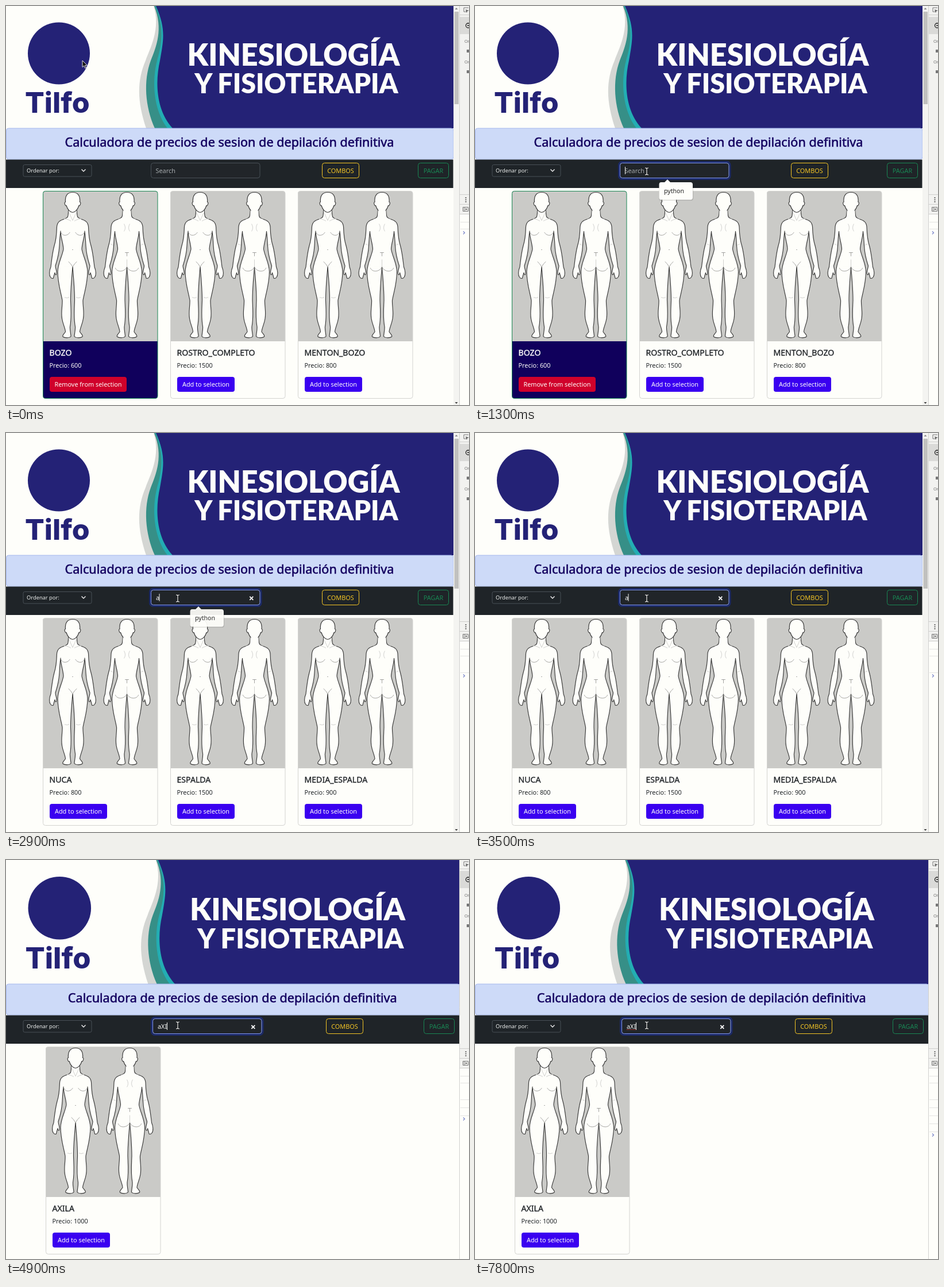
An HTML page that plays this animation: 806 px wide and 695 px high, repeating every 8 s.

```html
<!DOCTYPE html>
<html lang="es">
<head>
<meta charset="utf-8">
<title>Calculadora de precios</title>
<style>
html, body { margin: 0; width: 100%; height: 100%; overflow: hidden; background: #fefefa; }
svg { display: block; width: 806px; height: 695px; }
text { font: 10.9px "Noto Sans", "Open Sans", sans-serif; }
.big { font: 900 52px Lato, sans-serif; fill: #fefefa; }
.brand { font: 800 50px Inter, sans-serif; fill: #242276; }
.head { font-size: 21.65px; fill: #13005f; stroke: #13005f; stroke-width: .55; }
.name { font-size: 14.1px; stroke-width: .35; }
.small { font-size: 9.3px; }
.skin { fill: #fefefa; stroke: #3a3a3a; stroke-width: 1.15; stroke-linejoin: round; }
.mark { fill: none; stroke: #8d8d8b; stroke-width: .8; stroke-linecap: round; }
.faint { fill: none; stroke: #c6c6c4; stroke-width: .8; }
.line { stroke: #e4e4e2; }
</style>
</head>
<body>
<svg viewBox="0 0 806 695">
  <defs>
    <path id="half" d="M7,30 C8,44 7,46 14,48.500 C22,51 26.500,53 27.500,62 C28,78 29,86 32,95 C35.500,108 36.500,120 38,132 C40.500,138 41.500,146 38.500,150 Q36,153 33.500,151.500 C33,148 32,146 31,142 C30.500,147 27.500,147 28,141 C28,137 30,134 30,130 C26,118 23.500,105 23,95 C22.500,85 22,78 21,70 C20.500,82 16.500,90 16,101 C18,113 25.500,125 26,140 C26,160 21,174 18,190 C17.500,200 20.500,210 18.500,222 C17,232 13,238 12.500,245 C15,249 18.500,251 17,253.500 C14,256 5,256 3,253 C3,248 5,243 4.500,236 C1.500,220 3,205 3.500,190 C3.500,170 1.500,150 0,132"/>
    <g id="body">
      <use href="#half" class="skin"/>
      <use href="#half" class="skin" transform="scale(-1 1)"/>
      <path fill="#fefefa" d="M-7,30 H7 V46 L15,49 V131 H-15 V49 L-7,46Z"/>
      <path class="skin" d="M0,2 C9,2 13.500,8 12.500,19 Q15,19 13,24 Q12,26 11,25 C9,32 4,37 0,37 C-4,37 -9,32 -11,25 Q-12,26 -13,24 Q-15,19 -12.500,19 C-13.500,8 -9,2 0,2Z"/>
    </g>
    <g id="figures">
      <path fill="#cacac7" d="M0,4 Q0,0 4,0 H196 Q200,0 200,4 V261.500 H0Z"/>
      <g transform="translate(52 0)">
        <use href="#body"/>
        <path class="mark" d="M-21,69 C-20,79 -9,79 -5,72 M21,69 C20,79 9,79 5,72 M-7,123 Q-3,126 0,132 Q3,126 7,123 M-.500,102 h1"/>
        <path class="faint" d="M-6,38 L0,51 L6,38 M-15,48 Q-7,49 -3,52 M15,48 Q7,49 3,52 M-14,185 q4,2 8,0 M6,185 q4,2 8,0"/>
      </g>
      <g transform="translate(146.500 0)">
        <use href="#body"/>
        <path fill="#fefefa" d="M-6,29 H6 V40 H-6Z"/>
        <path class="mark" d="M-20,134 C-18,141 -5,142 0,132 C5,142 18,141 20,134 M-3,107 h6 M0,107 v6"/>
        <path class="faint" d="M-5,57 Q-1,64 -5,70 M5,57 Q1,64 5,70 M-29,92 l5,2 M29,92 l-5,2 M0,119 V132"/>
      </g>
    </g>
  </defs>

  <rect width="806" height="695" fill="#fefefa"/>

  <g id="banner">
    <path fill="#d4d6d3" d="M257,0 C270,40 250,75 243,95 C228,130 228,165 244,213 H300 V0Z"/>
    <path fill="#368f87" d="M258,0 C274,40 262,70 252,95 C239,130 242,175 259,213 H300 V0Z"/>
    <path fill="#23adb3" d="M260,0 C277,40 270,70 263,95 C254,130 256,180 281,213 H300 V0Z"/>
    <path fill="#242276" d="M261,0 C279,40 274,60 268,95 C260,130 260,180 290,213 H779 V0Z"/>
    <circle cx="92" cy="82.500" r="54" fill="#242276"/>
    <text class="brand" x="33" y="186">Tilfo</text>
    <text class="big" x="500.500" y="104" text-anchor="middle">KINESIOLOGÍA</text>
    <text class="big" x="505.500" y="152" text-anchor="middle" style="font-size:46.600px">Y FISIOTERAPIA</text>
  </g>

  <g id="bar">
    <rect class="wide" x=".5" y="213" width="778" height="54" rx="4" fill="#cddaf8" stroke="#a6b8ee"/>
    <rect class="wide" y="267.500" width="779" height="49.500" fill="#1f2428"/>
    <text id="title" class="head" x="389" y="245" text-anchor="middle">Calculadora de precios de sesion de depilación definitiva</text>
    <rect x="30" y="276.500" width="119" height="20.500" rx="2.500" fill="none" stroke="#495057"/>
    <text class="small" x="36" y="290" fill="#eceeed">Ordenar por:</text>
    <path d="M131.500,284.500 l3.500,3.500 l3.500,-3.500" fill="none" stroke="#eee" stroke-width="1.400"/>
    <g id="combos">
      <rect x="550.500" y="273.500" width="64" height="26" rx="4" fill="none" stroke="#f4c525"/>
      <text x="582.500" y="290.500" text-anchor="middle" fill="#f4c525">COMBOS</text>
    </g>
    <g id="pay">
      <rect x="717.500" y="273.500" width="53" height="26" rx="4" fill="none" stroke="#198754"/>
      <text x="744" y="290.500" text-anchor="middle" fill="#198754">PAGAR</text>
    </g>
    <g id="field">
      <rect x="252.500" y="273.500" width="189.500" height="26" rx="4" fill="#212529" stroke="#495057"/>
      <g id="focus" fill="none">
        <rect x="250.500" y="271.500" width="193.500" height="30" rx="5.500" stroke="#1c2a68" stroke-width="3"/>
        <rect x="252.500" y="273.500" width="189.500" height="26" rx="4" stroke="#8096ee"/>
      </g>
      <text id="hint" x="260.500" y="290.500" font-size="10.700" fill="#a6abae">Search</text>
      <g fill="#f5f6f4">
        <text id="q1" x="261" y="290.500">a</text>
        <text id="q3" x="261" y="290.500">aXI</text>
        <text id="q4" x="261" y="290.500">aXIL</text>
      </g>
      <path id="clear" d="M424.300,284.800 l6,6 m0,-6 l-6,6" stroke="#fff" stroke-width="1.800"/>
      <g id="spell"><path id="wave" d="M261,292.500 h17" stroke="#e0352f" stroke-dasharray="1.500 1"/></g>
      <g id="caretX"><rect id="caret" y="280" width="1" height="13" fill="#f5f6f4"/></g>
    </g>
  </g>

  <g id="setA"></g>
  <g id="setB"></g>
  <g id="setC"></g>

  <g id="scroll">
    <rect x="779" width="11" height="695" fill="#f4f4f1"/>
    <rect id="thumb" x="780.500" y="10" width="7.500" height="161" fill="#c1c1bf"/>
    <path d="M781.500,6 l2.500,-3 l2.500,3Z" fill="#888"/>
    <path d="M781.500,690 l2.500,3 l2.500,-3Z" fill="#444"/>
  </g>

  <g id="tools">
    <rect x="789" width="17" height="695" fill="#fefefa"/>
    <rect x="789" width="17" height="362" fill="#f2f2f0"/>
    <rect x="790" y="19" width="16" height="30" fill="#dadad8"/>
    <path d="M790,15.500 h16 M790,328.500 h16 M790,345.500 h16 M790,362.500 h16" stroke="#cfcfcd"/>
    <path d="M789.500,0 V695" stroke="#d0d0ce"/>
    <path d="M803,10 h-6 v-7 h8" fill="none" stroke="#777"/>
    <path d="M800,6 l6,2 l-3,1 l-1,3Z" fill="#666"/>
    <circle cx="804.500" cy="34" r="4" fill="none" stroke="#222" stroke-width="1.300"/>
    <path d="M803,34 h3" stroke="#222" stroke-width="1.500"/>
    <text x="798" y="64" fill="#777" style="font-size:7.5px">Or</text>
    <text x="798" y="100" fill="#777" style="font-size:7.5px">Or</text>
    <path d="M802,76 h4 v5 h-4Z M802,112 h4 v5 h-4Z" fill="#777"/>
    <path d="M799.500,333 h2 v2 h-2Z m0,3.500 h2 v2 h-2Z m0,3.500 h2 v2 h-2Z" fill="#666"/>
    <path d="M795.500,350.500 h9 v7 h-9Z M798,350.500 v7" fill="none" stroke="#777"/>
    <path d="M800,352 l3,2 l-3,2Z" fill="#666"/>
    <path class="line" d="M791,376.500 h15 M791,388.500 h15"/>
    <path id="log1" class="line" d="M791,417.500 h15"/>
    <path id="log2" class="line" d="M791,431.500 h15 M791,445.500 h15"/>
    <path id="log3" class="line" d="M791,459.500 h15"/>
    <path id="log4" class="line" d="M791,473.500 h15"/>
    <path id="prompt" d="M796,392.500 l2.500,2.500 l-2.500,2.500" fill="none" stroke="#7682c8" stroke-width="1.200"/>
  </g>

  <g id="tip">
    <rect x="320" y="307.500" width="60" height="31.500" rx="4" fill="#000" opacity=".13"/>
    <path d="M324,307 h6 l5,-5 l5,5 h35 q4,0 4,4 v22.500 q0,4 -4,4 h-51 q-3.500,0 -3.500,-4 v-22.500 q0,-4 3.500,-4Z" fill="#fefefa"/>
    <text x="329" y="326" fill="#222" style="font-size:10.6px">python</text>
  </g>

  <g id="arrowPos"><path id="arrow" d="M0,0 V11.500 L2.700,9 L4.700,13.300 L6.600,12.400 L4.700,8.300 H8.300Z" fill="#111" stroke="#f5f5f2" stroke-width=".9"/></g>
  <g id="beamPos"><g id="beam" fill="none">
    <path d="M-3,-6 Q0,-6 0,-4.500 Q0,-6 3,-6 M0,-5 V5 M-3,6 Q0,6 0,4.500 Q0,6 3,6" stroke="#15181b" stroke-width="3"/>
    <path d="M-3,-6 Q0,-6 0,-4.500 Q0,-6 3,-6 M0,-5 V5 M-3,6 Q0,6 0,4.500 Q0,6 3,6" stroke="#f4f4f2" stroke-width="1.200"/>
  </g></g>
</svg>
<script>
const LOOP = 8000, FILTER = 2900, NARROW = 4900;
const el = id => document.getElementById(id);

// Cards
function card(x, y, name, price, picked) {
  const ink = picked ? '#fefefa' : '#212529';
  const label = picked ? 'Remove from selection' : 'Add to selection';
  const width = picked ? 134 : 100;
  return `<g transform="translate(${x} ${y})">
    <rect x=".5" width="199.500" height="361" rx="4" fill="${picked ? '#10005c' : '#fefefa'}"/>
    <use href="#figures"/>
    <rect x=".5" width="199.500" height="361" rx="4" fill="none" stroke="${picked ? '#198754' : '#d3d3d0'}"/>
    <text class="name" x="11.500" y="286" fill="${ink}" stroke="${ink}">${name}</text>
    <text x="11.500" y="307.500" fill="${ink}">Precio: ${price}</text>
    <rect x="12" y="323.500" width="${width}" height="26" rx="4" fill="${picked ? '#d0022b' : '#3a00f0'}"/>
    <text x="${12 + width / 2}" y="340.500" text-anchor="middle" fill="#fefefa">${label}</text>
  </g>`;
}
el('setA').innerHTML = card(64, 322.5, 'BOZO', 600, true) +
  card(286, 322.5, 'ROSTRO_COMPLETO', 1500) + card(508, 322.5, 'MENTON_BOZO', 800);
el('setB').innerHTML = card(64, 322.5, 'NUCA', 800) +
  card(286, 322.5, 'ESPALDA', 1500) + card(508, 322.5, 'MEDIA_ESPALDA', 900);
el('setC').innerHTML = card(69, 325.5, 'AXILA', 1000);

// Stepped keyframes from a timeline of [ms, value]
const sheet = document.head.appendChild(document.createElement('style'));
let count = 0, rules = '';
function track(target, prop, steps) {
  const name = 'k' + count++;
  const frames = steps.map(([t, v]) => `${t / LOOP * 100}% { ${prop}: ${v} }`).join(' ');
  rules += `@keyframes ${name} { ${frames} }
${target} { animation: ${name} ${LOOP}ms step-end infinite }\n`;
}
const fade = (target, ...steps) => track(target, 'opacity', [[0, 0], ...steps]);
const move = (target, ...steps) => track(target, 'transform',
  steps.map(([t, x, y = 0]) => [t, `translate(${x}px, ${y}px)`]));

track('#setA', 'opacity', [[0, 1], [FILTER, 0]]);
fade('#setB', [FILTER, 1], [NARROW, 0]);
fade('#setC', [NARROW, 1]);

// Without the scrollbar the page grows from 779 to 790 px
track('#scroll', 'opacity', [[0, 1], [NARROW, 0]]);
track('#thumb', 'height', [[0, '161px'], [FILTER, '261px']]);
track('#banner', 'transform', [[0, 'scale(1)'], [NARROW, `scale(${790 / 779})`]]);
track('.wide', 'width', [[0, '778.5px'], [NARROW, '789.5px']]);
move('#bar', [0, 0], [NARROW, 0, 3]);
move('#title', [0, 0], [NARROW, 5.3]);
move('#field', [0, 0], [NARROW, 3]);
move('#combos', [0, 0], [NARROW, 7]);
move('#pay', [0, 0], [NARROW, 10]);

// Pointer
move('#arrowPos', [0, 133, 95], [300, 139, 103], [400, 160, 141], [500, 195, 207],
  [600, 229, 271], [700, 253, 306], [800, 279, 304]);
track('#arrow', 'opacity', [[0, 1], [900, 0]]);
move('#beamPos', [0, 296.5, 291], [1100, 299, 288]);
fade('#beam', [900, 1]);

// Search field
fade('#focus', [1100, .5], [1200, 1]);
fade('#tip', [1200, .5], [1300, 1], [2900, .94], [3000, .5], [3100, .06], [3500, 0]);
track('#hint', 'opacity', [[0, 1], [FILTER, 0]]);
fade('#q1', [FILTER, 1], [NARROW, 0]);
fade('#q3', [NARROW, 1], [5100, 0], [6500, 1]);
fade('#q4', [5100, 1], [6500, 0]);
fade('#clear', [FILTER, 1]);
move('#caretX', [0, 261], [FILTER, 266.5], [NARROW, 277], [5100, 283], [6500, 277]);
fade('#caret', [1200, 1], [2000, 0], [2300, 1], [3700, 0], [4100, 1], [4700, 0],
  [4900, 1], [5700, 0], [6300, 1], [6800, 0], [7800, 1]);
fade('#spell', [6100, 1], [6500, 0], [7500, 1]);
track('#wave', 'd', [[0, 'path("M261,292.500 h23")'], [6500, 'path("M261,292.500 h17")']]);

// Console
move('#prompt', [0, 0, 0], [FILTER, 0, 28], [NARROW, 0, 56], [5500, 0, 70], [6900, 0, 84]);
fade('#log1', [FILTER, 1]);
fade('#log2', [NARROW, 1]);
fade('#log3', [5500, 1]);
fade('#log4', [6900, 1]);

sheet.textContent = rules;
</script>
</body>
</html>
```
